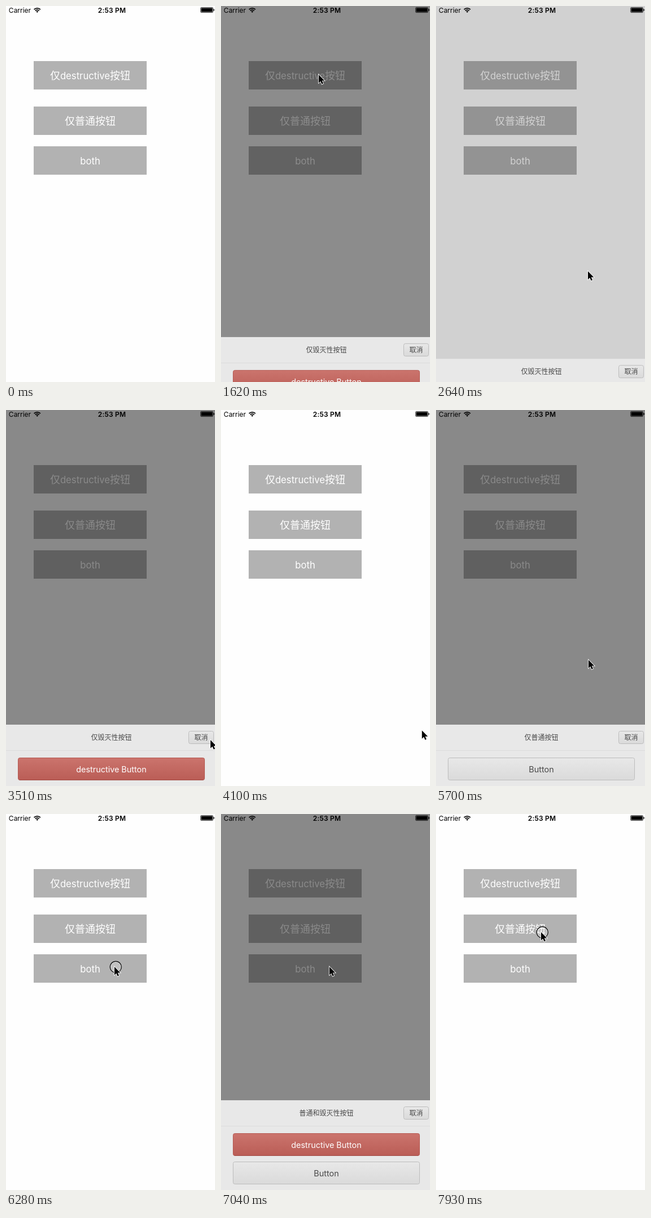
Write an HTML page that moves like this. It is 370 px wide and 662 px high and loops after 8 s.

```html
<!DOCTYPE html>
<html lang="zh-CN">
<head>
<meta charset="utf-8">
<title>Action sheet</title>
<style>
  html, body { margin: 0; width: 100%; height: 100%; overflow: hidden; background: #fefefe; }
  svg { display: block; width: 370px; height: 662px; }
  text { font-family: Inter, "Noto Sans CJK SC", "Noto Sans CJK", sans-serif; text-anchor: middle; }
  .status { font-size: 12px; }
  .label { font-size: 18px; fill: #fff; }
  .latin { font-size: 16.7px; }
  .small { font-size: 12px; fill: #484848; }
  .action { font-size: 14.4px; }
</style>
</head>
<body>
<svg viewBox="0 0 370 662">
  <defs>
    <linearGradient id="red" x2="0" y2="1">
      <stop stop-color="#cb746d"/><stop offset="1" stop-color="#ba5d56"/>
    </linearGradient>
    <linearGradient id="plain" x2="0" y2="1">
      <stop stop-color="#e8e8e8"/><stop offset="1" stop-color="#dadada"/>
    </linearGradient>
  </defs>

  <rect width="370" height="662" fill="#fefefe"/>
  <g fill="#b2b2b2">
    <rect x="49" y="97" width="200" height="50"/>
    <rect x="49" y="177" width="200" height="50"/>
    <rect x="49" y="247" width="200" height="50"/>
  </g>
  <text class="label" x="149" y="128.5">仅<tspan class="latin">destructive</tspan>按钮</text>
  <text class="label" x="149" y="208.5">仅普通按钮</text>
  <text class="label latin" x="149" y="278.5">both</text>

  <rect id="dim" width="370" height="662" opacity="0"/>

  <text class="status" x="24.5" y="11.5">Carrier</text>
  <text class="status" x="187.5" y="11.5" font-weight="600" letter-spacing=".2">2:53 PM</text>
  <g fill="none" stroke="#000" stroke-width="1.7">
    <path d="M49.6 6.2A8 8 0 0 1 60.9 6.2M51.7 8.4A5 5 0 0 1 58.8 8.4"/>
    <path d="M55.25 11.8L53.3 9.8A2.8 2.8 0 0 1 57.2 9.8Z" fill="#000" stroke="none"/>
  </g>
  <rect x="344.5" y="2.5" width="22" height="9" rx="1.5" fill="none" stroke="#000" stroke-width=".7"/>
  <rect x="345.5" y="3.5" width="20" height="7" rx=".6"/>
  <path d="M367.3 5.2Q369 5.5 369 7T367.3 8.8Z"/>

  <g id="sheet">
    <rect width="370" height="170" fill="#e8e8e8"/>
    <text id="title" class="small" x="186.5" y="27.3"></text>
    <rect x="323.5" y="11.5" width="44" height="22" rx="3" fill="url(#plain)" stroke="#bcbcbc"/>
    <text class="small" x="345.5" y="27.3">取消</text>
    <path d="M0 45.5H370" stroke="#dcdcdc"/>
    <g id="destructive">
      <rect x="21.5" y="58.5" width="330" height="39" rx="3" fill="url(#red)" stroke="#b65b54"/>
      <path d="M24 97.5H349" stroke="#a24b45"/>
      <text class="label action" x="186.5" y="84">destructive Button</text>
    </g>
    <g id="normal">
      <rect x="21.5" y="58.5" width="330" height="39" rx="3" fill="url(#plain)" stroke="#bcbcbc"/>
      <text class="action" x="186.5" y="84" fill="#484848">Button</text>
    </g>
  </g>

  <g id="cursor">
    <g id="ring" fill="none">
      <circle cx="2.3" cy=".3" r="9.2" fill="#fff" fill-opacity=".2" stroke="#fff" stroke-opacity=".8"/>
      <circle cx="2.3" cy=".3" r="10" stroke="#000" stroke-width="1.2"/>
    </g>
    <path d="M0 0V14.5L3.3 11.4L5.6 16.6L8 15.6L5.7 10.5H10.3Z" stroke="#fff" stroke-width="1.6" paint-order="stroke"/>
  </g>
</svg>
<script>
const $ = id => document.getElementById(id);
const LOOP = 8000, SLIDE = 270;

// [time, x, y]
const path = [
  [298, 263, 293], [1170, 173, 121], [1610, 173, 121], [2340, 269, 467],
  [2630, 269, 467], [3060, 175, 122], [3210, 175, 122], [3500, 362, 581],
  [3930, 362, 581], [4960, 261, 309], [5100, 193, 202], [5400, 193, 202],
  [5690, 270, 440], [5840, 270, 440], [6130, 192, 269], [7036, 192, 269],
  [7185, 240, 420], [7340, 240, 420], [7780, 186, 208]
];
const presses = [1310, 2335, 3060, 3645, 5100, 5690, 6265, 7180, 7925];
const kinds = {
  destructive: { title: "仅毁灭性按钮", height: 108, red: true },
  normal: { title: "仅普通按钮", height: 108, grey: true },
  both: { title: "普通和毁灭性按钮", height: 158, red: true, grey: true }
};
const sheets = [
  { kind: kinds.destructive, up: 1431, down: 2472 },
  { kind: kinds.destructive, up: 3140, down: 3780 },
  { kind: kinds.normal, up: 5220, down: 5800 },
  { kind: kinds.both, up: 6390, down: 7300 }
];

const ease = x => {
  x = Math.min(1, Math.max(0, x));
  return x * x * (3 - 2 * x);
};
const show = (id, on) => $(id).setAttribute("visibility", on ? "inherit" : "hidden");
const move = (id, x, y) => $(id).setAttribute("transform", `translate(${x} ${y})`);

function snap(t) {
  if (t < 298) return 0;
  const [start, step] = t < 7036 ? [298, 145.7] : [7036, 148.7];
  const last = t < 7036 ? 44 : 6;
  return start + Math.min(last, Math.floor((t - start) / step)) * step;
}

function drawSheet(t) {
  const sheet = sheets.find(s => t >= s.up && t < s.down + SLIDE);
  $("sheet").setAttribute("visibility", sheet ? "visible" : "hidden");
  if (!sheet) return $("dim").setAttribute("opacity", 0);
  const { kind, up, down } = sheet;
  const rising = t < down;
  const p = rising ? ease((t - up) / SLIDE) : 1 - ease((t - down) / SLIDE);
  $("dim").setAttribute("opacity", 0.463 * (rising ? 1 - (1 - p) ** 2.7 : p));
  $("title").textContent = kind.title;
  show("destructive", kind.red);
  show("normal", kind.grey);
  move("normal", 0, kind.red ? 50 : 0);
  move("sheet", 0, 662 - kind.height * p);
}

function drawCursor(t) {
  $("cursor").setAttribute("visibility", t >= path[0][0] ? "visible" : "hidden");
  const next = path.findIndex(p => p[0] > t);
  const [t1, x1, y1] = next < 0 ? path[path.length - 1] : path[next];
  const [t0, x0, y0] = next > 0 ? path[next - 1] : [t1 - 1, x1, y1];
  const k = ease((t - t0) / (t1 - t0));
  move("cursor", x0 + (x1 - x0) * k, y0 + (y1 - y0) * k);
  show("ring", presses.some(p => t >= p && t < p + 140));
}

function draw(now) {
  const t = snap(now % LOOP);
  drawSheet(t);
  drawCursor(t);
}

const begin = performance.now();
function tick() {
  draw(performance.now() - begin);
  requestAnimationFrame(tick);
}
tick();
</script>
</body>
</html>
```
